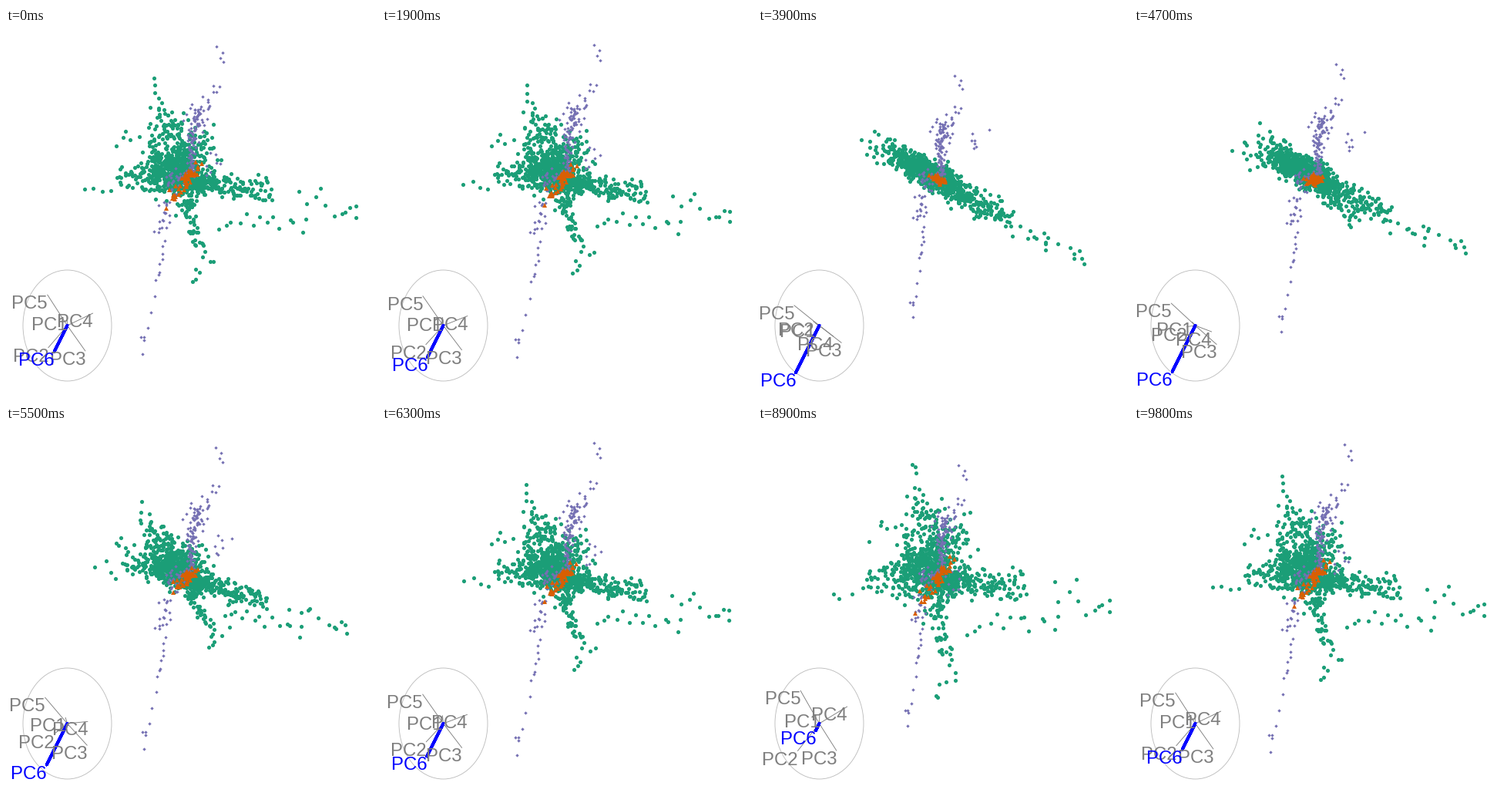
A matplotlib script for the animation above (10000 ms loop, 480 by 480 pixels).

```python
import numpy as np
import matplotlib.pyplot as plt
from matplotlib.animation import FuncAnimation
from matplotlib.patches import Ellipse

SIZE, DPI, STEP, LOOP = 480, 100, 100, 10000
GREEN, ORANGE, PURPLE = "#1B9E77", "#D95F02", "#7570B3"
PHI0 = 0.98                       # resting angle between PC6 and the plane
MID = (222, 189)                  # projected data origin
SLOPE = 0.775                     # fixed direction, in pixels
HUB = (79.5, 386)

rng = np.random.default_rng(6)
norm, uniform = rng.normal, rng.uniform

# Radial tour: angle of PC6 to the plane, and when each pose begins
phis = np.concatenate([PHI0 - 0.15 * np.arange(6), [0.04],
                       0.2 + 0.15 * np.arange(9), [1.55],
                       1.421 - 0.147 * np.arange(4)])
starts = np.concatenate([[0], np.arange(1900, 4000, 400),
                         np.arange(4700, 8400, 400),
                         np.arange(8900, 9900, 300)])


def tail(scale, limit, n):
    """Exponential draw folded back below a limit."""
    return rng.exponential(scale, n) % limit


def blob(n, x, y, sx, sy):
    return norm(x, sx, n), norm(y, sy, n)


def strand(n, start, end, jitter):
    """Points spread along a segment with some scatter."""
    t = np.linspace(0, 1, n)
    return tuple(p + (q - p) * t + norm(0, j, n)
                 for p, q, j in zip(start, end, jitter))


def join(*parts):
    return np.hstack([np.array(p) for p in parts])


def slide(pc6, b, phi):
    """Shift along the PC6 direction for a given angle."""
    return pc6 * np.cos(phi) + b * np.sin(phi)


class Cloud:
    """Points sliding along the PC6 direction as the angle changes."""

    def __init__(self, ax, xy, pc6, **style):
        x, y = xy
        self.base = (y - MID[1] + SLOPE * MID[0] + 2 * x) / (SLOPE + 2)
        s = 2 * (self.base - x)
        self.a = pc6(self.base, s)
        self.b = (s - self.a * np.cos(PHI0)) / np.sin(PHI0)
        self.line, = ax.plot([], [], ls="", mew=0, antialiased=False, **style)

    def pose(self, phi):
        s = slide(self.a, self.b, phi)
        y = MID[1] + SLOPE * (self.base - MID[0]) + s
        self.line.set_data(self.base - s / 2, y)


def green_points():
    up, right, down = tail(38, 88, 260), tail(48, 106, 190), tail(42, 72, 60)
    fan = norm(221, 18, 260) - 0.1 * up, 194 - up
    arm = (240 + right,
           200 + 0.12 * right + norm(0, 1, 190) * (4 + 0.06 * right))
    leg = norm(232, 6, 60) + 0.2 * down, 212 + down
    return join(
        blob(230, 213, 184, 17, 16), blob(160, 232, 195, 15, 11),
        blob(40, 252, 155, 10, 11), fan, arm, leg,
        strand(46, (146, 191), (200, 189), (3, 10)),       # left
        strand(4, (102, 210), (136, 212), (0, 1)),
        strand(9, (196, 68), (196, 122), (9, 3)),          # top
        strand(4, (143, 152), (172, 140), (2, 7)),
        strand(13, (275, 254), (384, 252), (3, 9)),        # right
        strand(12, (384, 222), (456, 236), (4, 14)),
        strand(9, (246, 284), (254, 331), (8, 2)))         # bottom


def purple_points():
    return join(
        strand(4, (276, 25), (281, 44), (1.5, 1)),
        strand(8, (273, 73), (259, 104), (4, 2)),
        blob(34, 250, 114, 7, 9),
        strand(66, (244, 118), (239, 192), (3.5, 3)),
        blob(24, 222, 194, 7, 6),
        strand(26, (215, 200), (198, 266), (5, 4)),
        strand(8, (205, 277), (197, 328), (3, 4)),
        strand(3, (192, 351), (184, 385), (1, 3)),
        blob(4, 179, 409, 3, 6))


def orange_points():
    t = norm(0, 1, 48)
    return np.array([234 + 9.5 * t + norm(0, 4, 48),
                     197 - 13 * t + norm(0, 5, 48)])


def sheet(noise):
    """PC6 value of points lying near a common tilted sheet."""
    return lambda base, s: -0.15 * (base - MID[0]) + norm(0, noise, len(base))


fig = plt.figure(figsize=(SIZE / DPI, SIZE / DPI), dpi=DPI, facecolor="white")
ax = fig.add_axes([0, 0, 1, 1])
ax.set(xlim=(0, SIZE), ylim=(SIZE, 0))
ax.axis("off")

diamond = dict(marker="D", ms=2.2, color=PURPLE)
clouds = [
    Cloud(ax, green_points(), sheet(7), marker="o", ms=3.7, color=GREEN),
    Cloud(ax, purple_points(), lambda base, s: 0.72 * s, **diamond),
    Cloud(ax, blob(7, 266, 170, 6, 17), lambda base, s: norm(-67, 8, len(s)),
          **diamond),
    Cloud(ax, orange_points(), sheet(1.5), marker="^", ms=3.9, color=ORANGE),
]

ax.add_patch(Ellipse(HUB, 115, 144, fill=False, ec="#BEBEBE", lw=0.65))


class Spoke:
    """One variable's line and label in the projection wheel."""

    def __init__(self, name, x, y, pc6, b, color="#7F7F7F", lw=0.65):
        self.root, self.a, self.b = (HUB[0] + x, HUB[1] + y), pc6, b
        self.line, = ax.plot([], [], color=color, lw=lw, antialiased=lw < 1,
                             solid_capstyle="round")
        self.label = ax.text(0, 0, name, color=color, size=17.28, ha="center",
                             va="baseline", family="Liberation Sans")

    def pose(self, phi):
        s = slide(self.a, self.b, phi)
        x, y = self.root[0] - s / 2, self.root[1] + s
        self.line.set_data([HUB[0], x], [HUB[1], y])
        self.label.set_position((x - 23, y + 18))


spokes = [
    Spoke("PC1", -5, -2.4, 0, -11),
    Spoke("PC2", -6.8, -7, 0, 43),
    Spoke("PC3", 29, 21.8, 0, 13.5),
    Spoke("PC4", 17.4, 15.6, 0, -38),
    Spoke("PC5", -33, -25.5, 0, -17.4),
    Spoke("PC6", 0, 0, 61, 0, color="#0000FF", lw=2.2),
]


def update(i):
    phi = phis[np.searchsorted(starts, i * STEP, side="right") - 1]
    for part in clouds + spokes:
        part.pose(phi)
    return []


anim = FuncAnimation(fig, update, frames=LOOP // STEP, interval=STEP,
                     repeat=True, repeat_delay=0)
plt.show()
```
